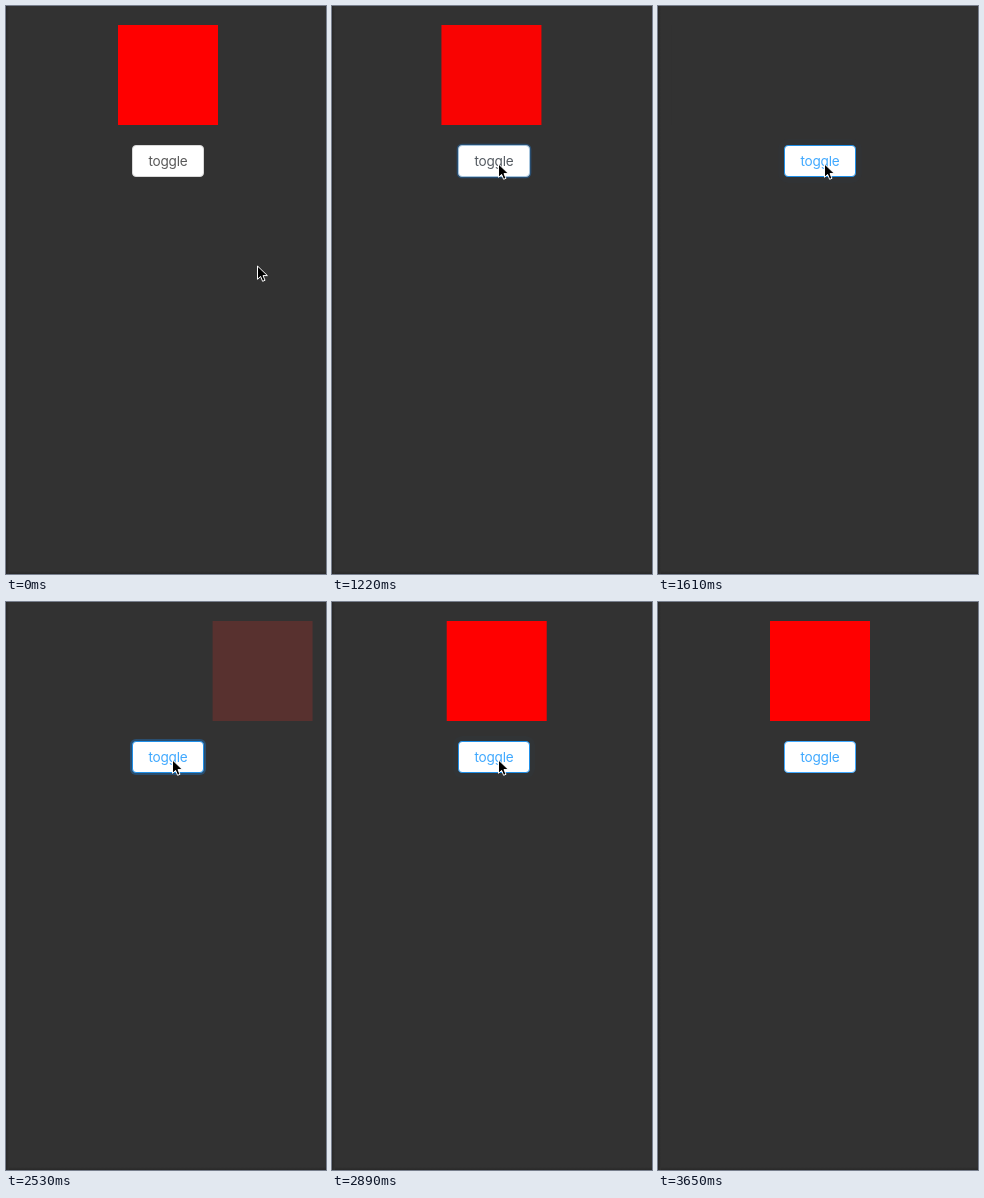
Write an HTML page that moves like this. It is 320 px wide and 568 px high and loops after 4120 ms.

```html
<!DOCTYPE html>
<html lang="en">
<head>
<meta charset="utf-8">
<title>Toggle</title>
<style>
  :root { --bg: #323232; --loop: 4120ms linear infinite; }
  html, body { margin: 0; width: 100%; height: 100%; overflow: hidden; background: var(--bg); }
  .stage {
    position: relative; width: 320px; height: 568px; overflow: hidden;
    background:
      linear-gradient(90deg, #282828, var(--bg)) 0 0 / 3px 100% no-repeat,
      linear-gradient(0deg, #282828, var(--bg)) 0 100% / 100% 3px no-repeat,
      var(--bg);
  }
  .box, .button, .cursor { position: absolute; }
  .box {
    left: 112px; top: 19px; width: 100px; height: 100px;
    animation: slide var(--loop), fade var(--loop);
  }
  .button {
    left: 126px; top: 139px; width: 72px; height: 32px; box-sizing: border-box;
    border: 1px solid #d9d9d9; border-radius: 4px; background: #fff; padding: 0;
    font: 13.6px/30px Inter, Roboto, sans-serif; letter-spacing: -.2px; text-align: center;
    white-space: nowrap;
    animation: tint var(--loop), edge var(--loop), wave var(--loop);
  }
  .cursor { left: 0; top: 0; width: 12px; height: 18px; overflow: visible; animation: point var(--loop); }

  @keyframes slide {
    0% { transform: none; }
    29.13% { transform: none; animation-timing-function: ease; }
    41.26% { transform: translateX(-100px); }
    41.27% { transform: translateX(100px); }
    60.58% { transform: translateX(100px); animation-timing-function: ease; }
    72.72%, 100% { transform: none; }
  }
  @keyframes fade {
    0% { background: #f00; }
    29.13% { background: #f00; animation-timing-function: cubic-bezier(.4, .1, .8, .7); }
    32.52% { background: #982c28; animation-timing-function: ease-out; }
    36.6% { background: #483231; }
    37.86%, 61.39% { background: #323232; }
    61.4%, 62.38% { background: #58312f; }
    63.83% { background: #962c28; }
    66.5% { background: #d61814; }
    70.1%, 100% { background: #f00; }
  }
  @keyframes tint {
    0%, 29.13% { color: #595959; }
    32.52% { color: #416493; }
    36.41%, 100% { color: #40a9ff; }
  }
  @keyframes edge {
    0%, 29.13% { border-color: #d9d9d9; }
    31%, 70.15% { border-color: #1f8fe8; }
    72.72%, 100% { border-color: #40a9ff; }
  }
  /* Click ripple around the button, once per press */
  @keyframes wave {
    0%, 29.13% { box-shadow: 0 0 0 0 rgba(24, 144, 255, .3); }
    29.9% { box-shadow: 0 0 0 2px rgba(24, 144, 255, .3); }
    32.52% { box-shadow: 0 0 0 5px rgba(24, 144, 255, .1); }
    39.08% { box-shadow: 0 0 0 6px rgba(24, 144, 255, .012); }
    41%, 60.68% { box-shadow: 0 0 0 0 rgba(24, 144, 255, .3); }
    61.4% { box-shadow: 0 0 0 2px rgba(24, 144, 255, .3); }
    64.08% { box-shadow: 0 0 0 5px rgba(24, 144, 255, .1); }
    70.15% { box-shadow: 0 0 0 5px rgba(24, 144, 255, .02); }
    72.82%, 100% { box-shadow: 0 0 0 6px rgba(24, 144, 255, 0); }
  }
  @keyframes point {
    0% { transform: translate(251px, 259px); }
    .73% { transform: translate(251px, 259px); animation-timing-function: cubic-bezier(.5, .15, .85, .63); }
    13.35% { transform: translate(204px, 190px); }
    14.08% { transform: translate(196px, 181px); animation-timing-function: cubic-bezier(.2, .4, .5, 1); }
    18.93% { transform: translate(166px, 157px); }
    75.24% { transform: translate(166px, 157px); animation-timing-function: cubic-bezier(.5, .1, .8, .7); }
    81.8% { transform: translate(239px, 366px); }
    86.41%, 88.58% { transform: translate(267px, 564px); }
    88.59%, 100% { transform: translate(267px, 600px); }
  }
</style>
</head>
<body>
<div class="stage">
  <div class="box"></div>
  <div class="button">toggle</div>
  <svg class="cursor" viewBox="0 0 12 18">
    <path d="M.5 1V14.3L3.6 11.4 5.6 16.3 8 15.3 6 10.6H10.4Z" stroke="#fff" stroke-linejoin="round"/>
  </svg>
</div>
</body>
</html>
```
